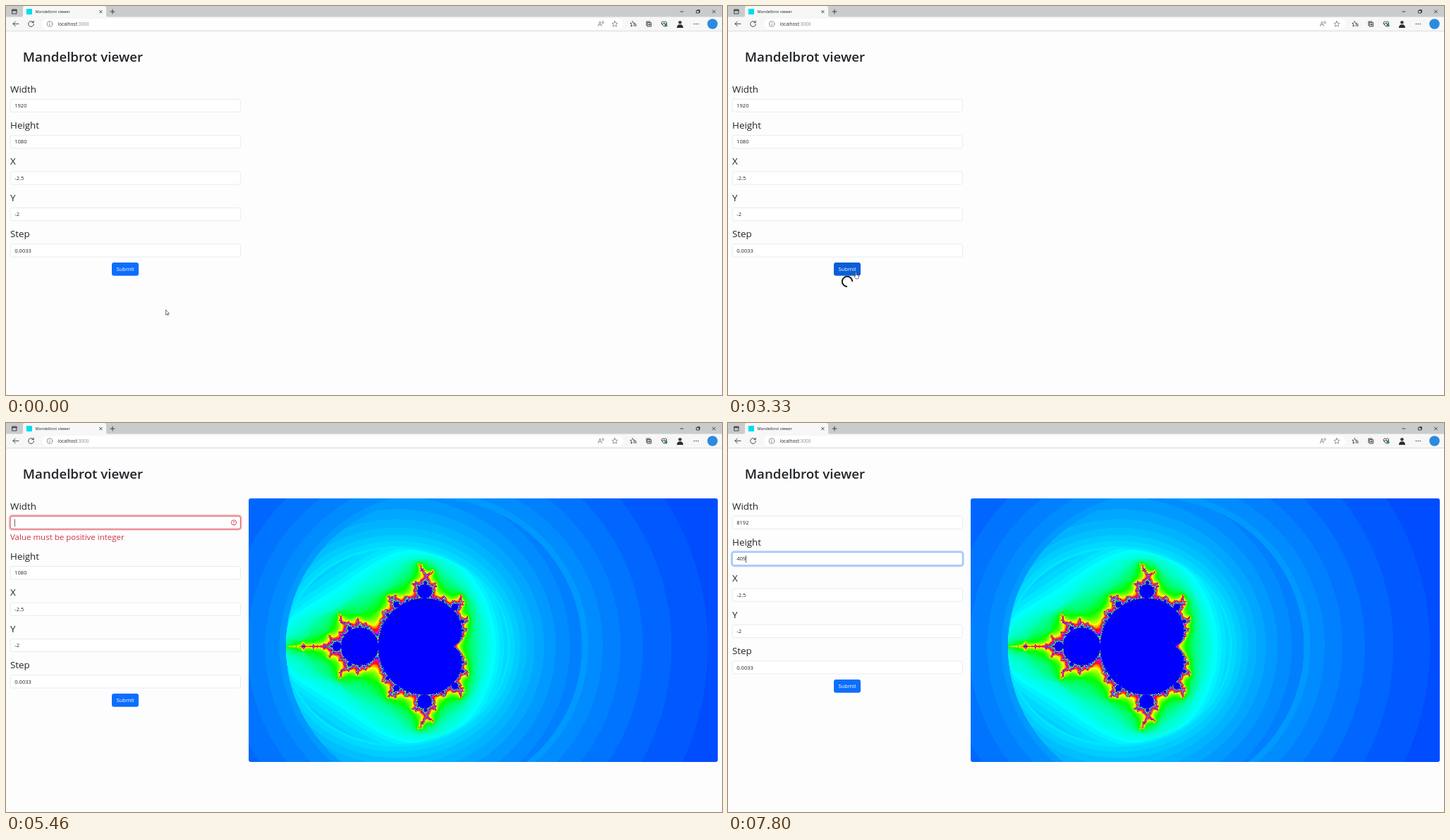
Animation of 1015 by 552 pixels, one loop 8 s. Source, as an HTML page with a canvas:

```html
<!DOCTYPE html>
<html lang="en">
<head>
<meta charset="utf-8">
<title>Mandelbrot viewer</title>
<style>
  html, body { margin: 0; width: 100%; height: 100%; overflow: hidden; background: #fdfdfd; }
  svg, canvas { position: absolute; left: 0; top: 0; }
  canvas { left: 344px; top: 107px; width: 665px; height: 374.3px; border-radius: 3px; }
  text { font-family: "Open Sans", "Noto Sans", sans-serif; fill: #212529; white-space: pre; }
  .label { font-size: 13.4px; }
  .value { font-size: 7.6px; }
  .error { font-size: 11.5px; fill: #d0324a; }
  .icon { fill: none; stroke: #333; stroke-width: .9; stroke-linecap: round; stroke-linejoin: round; }
  .pale { stroke: #888; }
</style>
</head>
<body>
<canvas id="fractal" width="1920" height="1080"></canvas>
<svg width="1015" height="552" viewBox="0 0 1015 552">
  <rect width="1015" height="16" fill="#c9cccd"/>
  <rect y="15.5" width="1015" height="20" fill="#f7f7f7"/>
  <path d="M21 16Q24 16 24 13V3Q24 0 27 0H139Q142 0 142 3V13Q142 16 145 16Z" fill="#f7f7f7"/>
  <rect y="35" width="1015" height=".8" fill="#d6d6d6"/>
  <rect x="51" y="18" width="824" height="15" rx="7.5" fill="#fff"/>
  <rect x="29" y="4" width="8" height="8" fill="#00dcee"/>
  <text x="41.5" y="10" font-size="5.63">Mandelbrot viewer</text>
  <text x="73.5" y="27.8" font-size="6.5">localhost<tspan fill="#888">:3000</tspan></text>
  <g class="icon">
    <path d="M9 5H15V11H9ZM9 6H15M9 6.7H15"/>
    <path d="M132.6 6.3L136.2 9.9M136.2 6.3L132.6 9.9M148 8H154M151 5V11"/>
    <path d="M956 8H960M979 6.5H982.5V10H979ZM980.2 5.5H983.5V9M1001.5 6L1005.5 10M1005.5 6L1001.5 10"/>
    <path d="M18 25.3H10M13.3 22L10 25.3L13.3 28.6"/>
    <path d="M38.8 23.2A3.9 3.9 0 1 0 39.5 25.7M39.2 21.2V23.6H36.8"/>
    <g class="pale">
      <circle cx="62" cy="25.5" r="3.8"/>
      <path d="M62 25V27.5M62 23.5V23.6"/>
      <path d="M839.5 28.5L842 22L844.5 28.5M840.4 26.3H843.6M845 22Q846.3 23 845.5 24.5M846.4 21.5Q848 23 847 25"/>
      <path id="star" d="M863 21.5L864.2 24.1L867 24.4L864.9 26.3L865.5 29.1L863 27.7L860.5 29.1L861.1 26.3L859 24.4L861.8 24.1Z"/>
    </g>
    <path d="M888 21.5L889.2 24.1L891.5 24.4M886.8 24.1L885 24.4L886.6 26.3L886 29.1L888 27.7M890 26H893.5M890 28H893.5"/>
    <path d="M909.5 23.5H914.5V29H909.5ZM908 27.5V22H913M912 24.8V27.7M910.6 26.2H913.4"/>
    <path d="M933 29L929.6 25.7Q928.5 23.6 930 22.4Q931.7 21.3 933 23Q934.3 21.3 936 22.4Q937.5 23.6 936.4 25.7ZM930 25.3H932L933 24L934 26L935 25H936"/>
  </g>
  <circle cx="935.6" cy="27.6" r="2" fill="#1f8f4d"/>
  <circle cx="955.5" cy="23.2" r="2.3" fill="#4b3a32"/>
  <path d="M951 31Q951 26.3 955.5 26.3Q960 26.3 960 31Z" fill="#2b2b2e"/>
  <g fill="#333"><circle cx="975.5" cy="25.5" r=".75"/><circle cx="978.3" cy="25.5" r=".75"/><circle cx="981.1" cy="25.5" r=".75"/></g>
  <circle cx="1001.5" cy="25.5" r="7.3" fill="#2a8be0"/>
  <text x="23.8" y="78.8" font-size="18.7" font-weight="600">Mandelbrot viewer</text>
  <g id="form"></g>
  <g id="pointer"></g>
</svg>
<script>
const LOOP = 8000, IMAGE_AT = 3400, SPINNER_AT = 3236, ERROR_SHIFT = 20;
const $ = id => document.getElementById(id);
const clamp = v => Math.max(0, Math.min(1, v));
const fade = (t, start, end) => clamp((t - start) / 150) - clamp((t - end) / 150);
const latest = (steps, t) => steps.filter(s => s[0] <= t).pop();

function drawFractal() {
  const canvas = $('fractal'), { width, height } = canvas, step = 0.0033;
  const ctx = canvas.getContext('2d'), image = ctx.createImageData(width, height);
  const channel = (hue, offset) =>
    255 * clamp(Math.abs(((hue / 60 + offset) % 6 + 6) % 6 - 3) - 1);
  const hueAt = (cx, cy) => {
    const q = (cx - .25) ** 2 + cy * cy;
    if (q * (q + cx - .25) < cy * cy / 4 || (cx + 1) ** 2 + cy * cy < 1 / 16) return 240;
    let x = 0, y = 0;
    for (let n = 1; n <= 200; n++) {
      [x, y] = [x * x - y * y + cx, 2 * x * y + cy];
      const r2 = x * x + y * y;
      if (r2 > 4) {
        const smooth = n - Math.log2(Math.log(r2) / Math.log(4));
        return Math.round((222 - 18 * smooth) / 3) * 3;
      }
    }
    return 240;
  };
  for (let py = 0, i = 0; py < height; py++) {
    for (let px = 0; px < width; px++, i += 4) {
      const hue = hueAt(-2.5 + px * step, -2 + py * step);
      image.data[i] = channel(hue, 0);
      image.data[i + 1] = channel(hue, 4);
      image.data[i + 2] = channel(hue, 2);
      image.data[i + 3] = 255;
    }
  }
  ctx.putImageData(image, 0, 0);
}

const fields = [
  { label: 'Width', steps: [[0, '1920'], [5200, ''], [5730, '8'], [6000, '819'], [6200, '8192']],
    focus: [4460, 6460], error: [5200, 5730] },
  { label: 'Height', steps: [[0, '1080'], [7060, ''], [7330, '4'], [7530, '40'], [7730, '409']],
    focus: [6460, 1e5], error: [7060, 7330] },
  { label: 'X', steps: [[0, '-2.5']] },
  { label: 'Y', steps: [[0, '-2']] },
  { label: 'Step', steps: [[0, '0.0033']] }
];

const ruler = document.createElement('canvas').getContext('2d');
function textWidth(text) {
  ruler.font = '7.6px "Open Sans", "Noto Sans", sans-serif';
  return ruler.measureText(text).width;
}

function ring(y, opacity, border, glow) {
  return opacity <= 0 ? '' : `<g opacity="${opacity}" fill="none">
    <rect x="5" y="${y - 1}" width="328.5" height="20.6" rx="3.8" stroke="${glow}" stroke-opacity=".3" stroke-width="2.4"/>
    <rect x="6.2" y="${y + .2}" width="326.2" height="18.2" rx="2.8" stroke="${border}" stroke-width=".8"/></g>`;
}

function fieldMarkup(field, y, t) {
  const [since, value] = latest(field.steps, t);
  const [from, to] = field.focus || [1e6, 1e6];
  const focused = t >= from && t < to;
  const selected = focused && since === 0;
  const width = textWidth(value);
  let out = `<text class="label" x="6" y="${y - 9.4}">${field.label}</text>
    <rect x="6.2" y="${y + .2}" width="326.2" height="18.2" rx="2.8" fill="#fff" stroke="#dee2e6" stroke-width=".7"/>`;
  if (field.focus) {
    const red = fade(t, ...field.error);
    out += ring(y, fade(t, from, to) * (1 - red), '#86b7fe', '#0d6efd')
      + ring(y, red, '#dc3545', '#dc3545');
  }
  if (selected) out += `<rect x="12.2" y="${y + 4.5}" width="${width}" height="12" fill="#2f8cf0"/>`;
  out += `<text class="value" x="12.2" y="${y + 12}"${selected ? ' style="fill:#fff"' : ''}>${value}</text>`;
  if (focused && !selected && (t - since) % 1060 < 530)
    out += `<rect x="${12.3 + width}" y="${y + 4.5}" width=".7" height="10.5" fill="#222"/>`;
  if (!value) out += `<g class="icon" style="stroke:#dc3545"><circle cx="323" cy="${y + 9.3}" r="3.6"/>
    <path d="M323 ${y + 7.4}v2.2m0 1.7v.1"/></g>
    <text class="error" x="6" y="${y + 34.2}">Value must be positive integer</text>`;
  return out;
}

// time, x, y
const path = [[0, 226.5, 431], [1660, 226.5, 431], [1800, 225, 428], [2000, 205, 411.5], [2500, 183, 383],
  [2700, 180.5, 377.5], [3460, 180.5, 377.5], [4200, 14, 117], [4330, 14, 141], [LOOP, 14, 141]];

function pointerAt(t) {
  const i = path.findIndex(p => p[0] > t);
  const [t0, x0, y0] = path[i - 1], [t1, x1, y1] = path[i];
  const k = (t - t0) / (t1 - t0);
  return [x0 + (x1 - x0) * k, y0 + (y1 - y0) * k];
}

const pointers = {
  arrow: '<path d="M0 0V7.3L1.7 5.8L2.8 8.2L3.8 7.7L2.8 5.4H5Z" fill="#fff" stroke="#222" stroke-width=".6"/>',
  hand: '<path d="M0 .5Q.7-.3 1.4.5V4L4.6 4.8Q5.3 5.2 5 6.5L4.2 9.5H.6L-2 6Q-1.6 4.9 0 6Z" fill="#fff" stroke="#222" stroke-width=".6"/>',
  beam: '<path d="M-1.3-4H1.3M0-4V4M-1.3 4H1.3" fill="none" stroke="#222" stroke-width=".7"/>'
};

function show(id, markup) {
  const node = $(id);
  if (node.markup !== markup) node.innerHTML = node.markup = markup;
}

function render(t) {
  let shift = 0, form = '';
  fields.forEach((field, i) => {
    form += fieldMarkup(field, 132 + i * 51.4 + shift, t);
    if (!latest(field.steps, t)[1]) shift = ERROR_SHIFT;
  });

  const [x, y] = pointerAt(t);
  const overButton = x > 150 && x < 188 && y > 364 && y < 383;
  const overText = x < 40 && y > 112 && y < 151;
  form += `<rect x="150" y="${364 + shift}" width="38" height="18.8" rx="3" fill="${overButton ? '#0b5ed7' : '#0d6efd'}"/>
    <text class="value" x="169" y="${376.2 + shift}" text-anchor="middle" style="fill:#fff">Submit</text>`;
  if (t >= SPINNER_AT && t < IMAGE_AT)
    form += `<path d="M174.1 385.9A7.2 7.2 0 1 0 174.1 396.1" fill="none" stroke="#212529" stroke-width="2.1"
      transform="rotate(${(t - SPINNER_AT) / 750 * 360} 169 391)"/>`;
  show('form', form);

  const shape = overButton ? 'hand' : overText ? 'beam' : 'arrow';
  show('pointer', t < 5200 ? `<g transform="translate(${x} ${y})">${pointers[shape]}</g>` : '');
  $('fractal').style.visibility = t >= IMAGE_AT ? 'visible' : 'hidden';
}

drawFractal();
let start;
function tick(now) {
  start ??= now;
  render((now - start) % LOOP);
  requestAnimationFrame(tick);
}
render(0);
requestAnimationFrame(tick);
</script>
</body>
</html>
```
